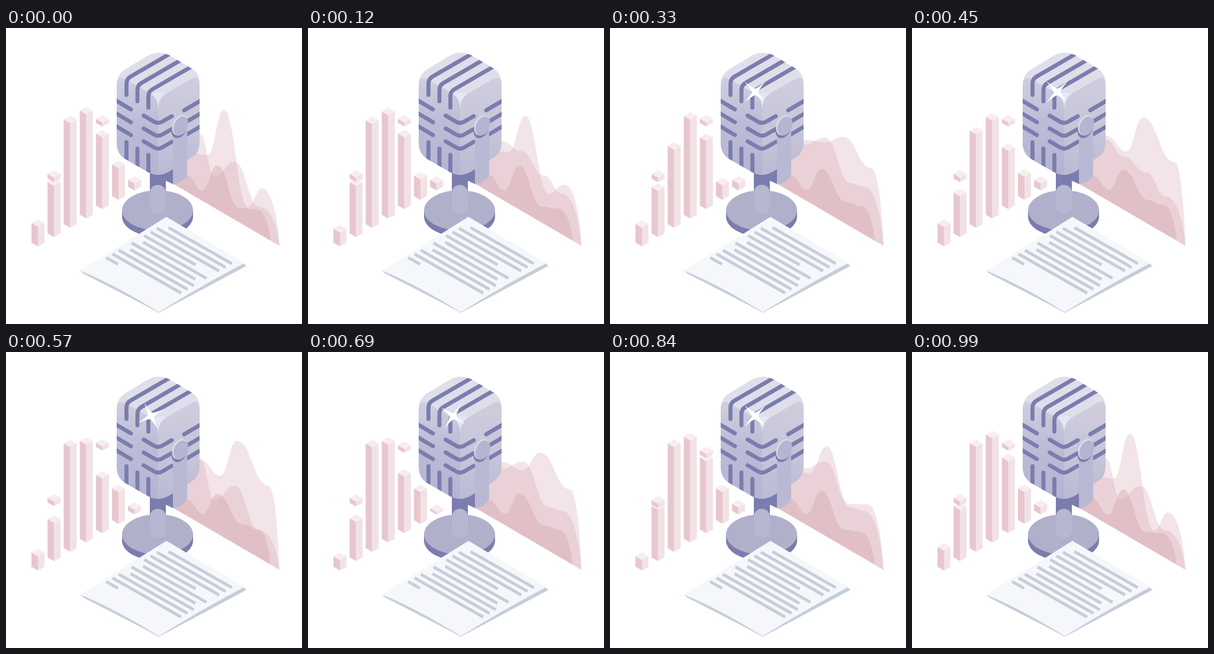
These frames come from a looping animation (500x500 px, 1020 ms). An HTML page:

```html
<!DOCTYPE html>
<html lang="en">
<head>
<meta charset="utf-8">
<title>Podcast microphone</title>
<style>
html, body { margin: 0; width: 100%; height: 100%; overflow: hidden; background: #fff; }
svg { display: block; width: 100vw; height: 100vh; }
.dark { fill: #7a7dad; }
#slots { fill: none; stroke: #7a7dad; stroke-width: 6.8; stroke-linecap: round; }
#waves { fill: #d5a5b0; }
#lines { fill: none; stroke: #c5ced8; stroke-width: 5; }
</style>
</head>
<body>
<svg viewBox="0 0 500 500">
  <defs>
    <linearGradient id="left" x1="0" y1="0" x2="0" y2="1">
      <stop offset="0" stop-color="#cfcfe0"/><stop offset=".45" stop-color="#bdbcd7"/><stop offset="1" stop-color="#b4b3d2"/>
    </linearGradient>
    <linearGradient id="right" x1="0" y1="0" x2="0" y2="1">
      <stop offset="0" stop-color="#cfcddd"/><stop offset=".6" stop-color="#c5c4d9"/><stop offset="1" stop-color="#b9bad4"/>
    </linearGradient>
    <clipPath id="body">
      <path d="M187 96Q187 79 201 70L239 47Q257 37 276 46L313 68Q327 77 327 93V193Q327 211 313 219L276 242Q257 253 239 243L201 221Q187 212 187 194Z"/>
    </clipPath>
  </defs>

  <g id="waves"></g>
  <g id="bars"></g>

  <path class="dark" d="M196 308V318.5A60 34 0 0 0 316 318.5V308Z"/>
  <ellipse cx="256" cy="308" rx="60" ry="34" fill="#b1b0cb"/>
  <path class="dark" d="M243 238H283V264L270 258V290H243Z"/>
  <rect x="243" y="265" width="27" height="49" rx="13" fill="#b7b7d1"/>

  <g clip-path="url(#body)">
    <rect x="187" y="38" width="140" height="212" fill="#dfdeea"/>
    <path fill="url(#left)" d="M187 98Q187 79 201 86L241 109Q257 118 257 137V250H187Z"/>
    <path fill="url(#right)" d="M327 96Q327 79 313 86L273 109Q257 118 257 137V250H327Z"/>
    <path fill="#e4e8f4" d="M246 112Q257 106 269 111Q257 119 257 137Q257 119 246 112Z"/>
    <g id="slots"></g>
  </g>
  <path fill="#b9b9d3" d="M282 170V264Q290 264 299 257Q306 252 306 246V160L296 156Z"/>
  <g transform="rotate(24 294 166)">
    <ellipse class="dark" cx="294" cy="169" rx="12.3" ry="18"/>
    <ellipse cx="293" cy="164.5" rx="12" ry="18" fill="#dedeeb"/>
    <ellipse cx="295" cy="165" rx="11.5" ry="17" fill="#b5b5d1"/>
  </g>

  <path fill="#c5ced8" d="M125 410L131 415L234 468L258 481L406 402L400 396Z"/>
  <path fill="#f5f7fb" d="M271 319L403 397C355 422 305 451 258 480C215 453 170 428 125 410Z"/>
  <path id="lines"/>
  <path id="star" fill="#fff" d="M0-25Q2-7 4-4Q7-2 25 0Q7 2 4 4Q2 7 0 25Q-2 7-4 4Q-7 2-25 0Q-7-2-4-4Q-2-7 0-25Z"/>
</svg>
<script>
const LOOP = 1020, STEP = 30;
const byId = id => document.getElementById(id);

function add(parent, attrs) {
  const el = document.createElementNS('http://www.w3.org/2000/svg', 'path');
  for (const k in attrs) el.setAttribute(k, attrs[k]);
  return byId(parent).appendChild(el);
}

const mix = (a, b, u) => a + (b - a) * u;

// Eased 0 to 1 between two times
function ramp(t, from, to) {
  const u = Math.max(0, Math.min(1, (t - from) / (to - from)));
  return (1 - Math.cos(Math.PI * u)) / 2;
}
// Rises from a to b, holds, falls from c to d
const pulse = (t, a, b, c, d) => ramp(t, a, b) - ramp(t, c, d);

// Bars stand in a row; each apex sinks from rest by drop. Caps float, with a thickness.
const bars = [
  { slot: 0, rest: 323, drop: 16, move: t => pulse(t, 0, 210, 215, 360) + pulse(t, 420, 690, 840, 1000) },
  { slot: 1, rest: 254, drop: 22, move: t => pulse(t, 150, 570, 660, 840) },
  { slot: 1, rest: 240, drop: 3.5, thick: 8, move: t => pulse(t, 660, 810, 860, 980) },
  { slot: 2, rest: 148, drop: 45, move: t => pulse(t, 90, 330, 340, 540) },
  { slot: 3, rest: 133, drop: 11, move: t => pulse(t, 0, 460, 690, 940) },
  { slot: 4, rest: 172, drop: 29, move: t => pulse(t, 240, 540, 650, 840) },
  { slot: 4, rest: 147, drop: 13, thick: 7, move: t => pulse(t, 600, 840, 850, 1010) },
  { slot: 5, rest: 224, drop: 29, move: t => pulse(t, 0, 200, 320, 580) },
  { slot: 6, rest: 250, drop: 7.5, move: t => pulse(t, 450, 690, 695, 840) }
];
for (const b of bars) {
  b.faces = ['#e7c7cf', '#f2e2e5', '#f7edef'].map(fill => add('bars', { fill }));
}

function drawBar(b, t) {
  const x = 54 + 27.2 * b.slot, y = b.rest + b.drop * b.move(t);
  const foot = b.thick ? y + 12.5 + b.thick : 369 - 15.75 * b.slot;
  const side = dx => `M${x} ${y + 12.5}L${x + dx} ${y + 6.2}V${foot - 6.2}L${x} ${foot}Z`;
  const top = `M${x} ${y}l11 6.2l-11 6.3l-11-6.3Z`;
  [side(-11), side(11), top].forEach((d, i) => b.faces[i].setAttribute('d', d));
}

// Waves: crests and dips that travel between two poses
const slow = t => pulse(t, 0, 480, 600, 980);
const twice = t => pulse(t, 0, 200, 340, 560) + pulse(t, 570, 680, 850, 1000);
const waves = [
  { alpha: .3, move: slow, end: [462, 368],
    from: [[300, 208], [341, 214], [368, 138], [409, 302], [432, 271]],
    to: [[300, 195], [328, 182], [362, 209], [390, 150], [443, 226]] },
  { alpha: .3, move: twice, end: [462, 368],
    from: [[300, 200], [328, 180], [352, 250], [386, 226], [428, 302]],
    to: [[300, 205], [328, 197], [363, 185], [406, 262], [429, 268]] },
  { alpha: .42, move: slow, end: [447, 359],
    from: [[306, 248], [331, 275], [357, 232], [394, 304], [422, 306]],
    to: [[306, 250], [333, 273], [357, 240], [400, 291], [424, 299]] }
];
for (const w of waves) w.el = add('waves', { 'fill-opacity': w.alpha });

function drawWave(w, t) {
  const u = w.move(t);
  const pts = w.from.map((p, i) => p.map((v, k) => mix(v, w.to[i][k], u)));
  let d = `M271 256.5L${pts[0]}`;
  for (let i = 1; i < pts.length; i++) {
    const [px, py] = pts[i - 1], [x, y] = pts[i];
    d += `C${mix(px, x, .45)} ${py} ${mix(px, x, .55)} ${y} ${x} ${y}`;
  }
  const [x, y] = pts[pts.length - 1], [ex, ey] = w.end;
  w.el.setAttribute('d', d + `C${mix(x, ex, .6)} ${y} ${ex - 2} ${mix(y, ey, .6)} ${ex} ${ey}Z`);
}

// Microphone grille
for (let i = 0; i < 3; i++) {
  const x = 203.5 + 18.5 * i, y = 10.7 * i, drop = 21.7 * i;
  [
    `M${x} ${113 + y}V${94 + y}Q${x} ${86 + y} ${x + 7} ${82 + y}l80-46.4`,
    `M${x} ${193 + y}v60`,
    `M180 ${119 + drop}L211 ${137.5 + drop}`,
    `M232.5 ${148 + drop}l17.5 10.2q7 4.2 14 0l16-9.2`,
    `M301 ${139 + drop}l34-20`
  ].forEach(d => add('slots', { d }));
}

// Text rows on the sheet
function textRow(i) {
  const indent = [0, 4, 6].includes(i) ? 9 : 0;
  const length = ({ 3: 87, 5: 108, 9: 20 }[i] || 116) - indent;
  return `M${265.5 - 10.7 * i + indent} ${332 + 6.2 * i + indent * .57}l${length} ${length * .57}`;
}
byId('lines').setAttribute('d', Array.from({ length: 10 }, (_, i) => textRow(i)).join(''));

function drawStar(t) {
  const size = pulse(t, 150, 350, 840, 980), turn = 45 + 90 * ramp(t, 500, 742);
  byId('star').setAttribute('transform', `translate(245 108) rotate(${turn}) scale(${size})`);
}

function render(now) {
  const t = Math.floor((now % LOOP) / STEP) * STEP;
  bars.forEach(b => drawBar(b, t));
  waves.forEach(w => drawWave(w, t));
  drawStar(t);
}

const start = performance.now();
function tick() {
  render(performance.now() - start);
  requestAnimationFrame(tick);
}
tick();
</script>
</body>
</html>
```
